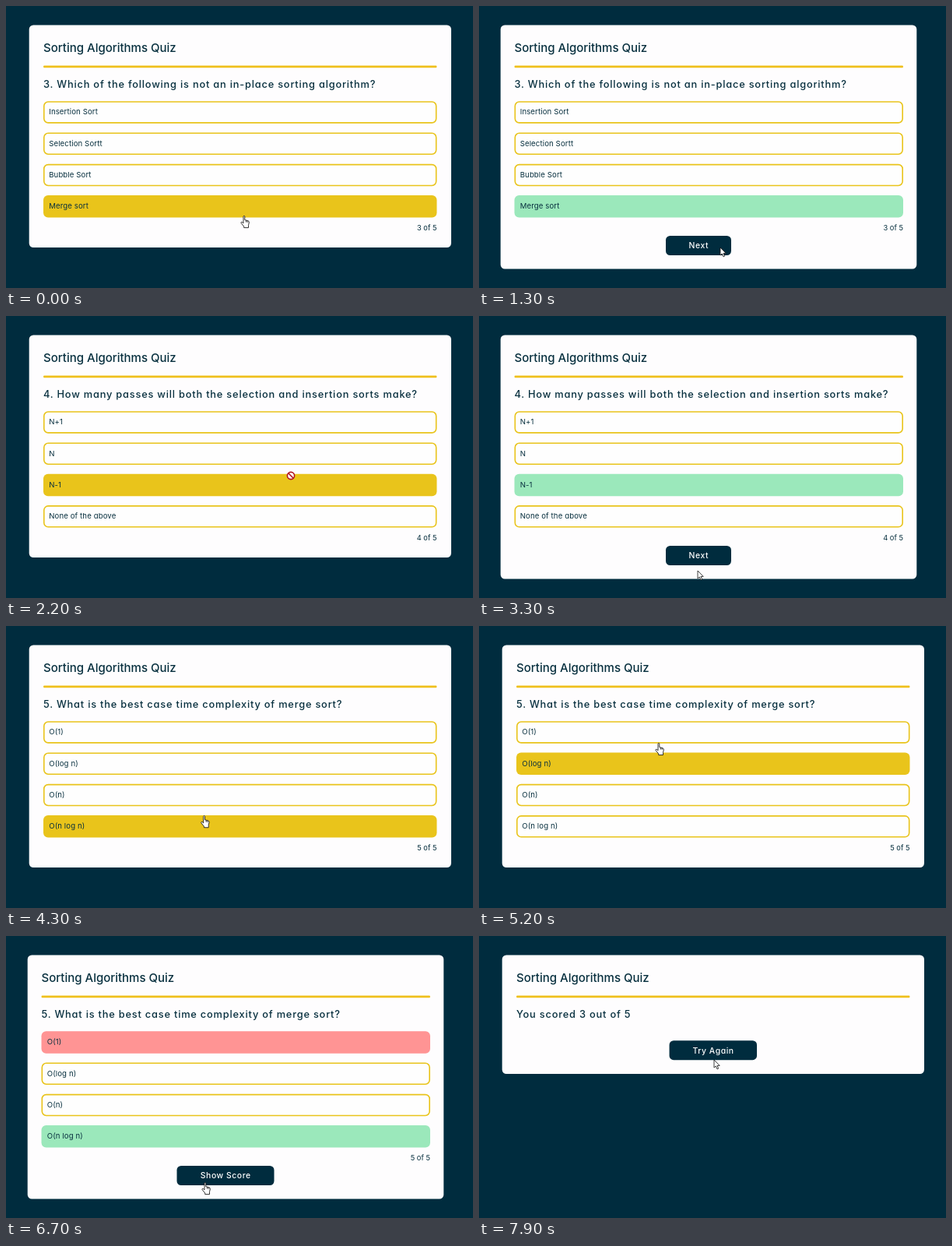
An HTML page for the animation above (8 s loop, 600 by 362 pixels).

```html
<!DOCTYPE html>
<html lang="en">
<head>
<meta charset="utf-8">
<title>Sorting Algorithms Quiz</title>
<style>
  html, body { margin: 0; width: 100%; height: 100%; overflow: hidden; background: #002c3e; }
  svg { display: block; width: 600px; height: 362px; }
  text {
    font-family: Inter, "Open Sans", sans-serif;
    font-feature-settings: "cv11";
    fill: #08303f;
    white-space: pre;
  }
  .title { font-size: 15px; font-weight: 500; }
  .question { font-size: 12.8px; font-weight: 500; letter-spacing: .8px; }
  .option { font-size: 9.6px; letter-spacing: .12px; }
  .count { font-size: 9.3px; text-anchor: end; }
  .button { font-size: 10.4px; font-weight: 500; letter-spacing: .55px; text-anchor: middle; fill: #fff; }
</style>
</head>
<body>
<svg id="stage" viewBox="0 0 600 362"></svg>
<script>
const stage = document.getElementById('stage');
const LOOP = 8000, STEP = 100;
const NAVY = '#002c3e', GOLD = '#e9c41b', GREEN = '#9be8bb', RED = '#ff9494';

// Each question: when it appears, when it is answered, which options are right and wrong.
const quiz = [
  { start: 0, answered: 400, right: 3, button: 'Next', width: 84,
    text: '3. Which of the following is not an in-place sorting algorithm?',
    options: ['Insertion Sort', 'Selection Sortt', 'Bubble Sort', 'Merge sort'] },
  { start: 1400, answered: 2300, right: 2, button: 'Next', width: 84,
    text: '4. How many passes will both the selection and insertion sorts make?',
    options: ['N+1', 'N', 'N-1', 'None of the above'] },
  { start: 4000, answered: 5700, right: 3, wrong: 0, button: 'Show Score', width: 125,
    text: '5. What is the best case time complexity of merge sort?',
    options: ['O(1)', 'O(log n)', 'O(n)', 'O(n log n)'] },
];
const SCORE_AT = 7200;

// Pointer path: time, x, y and, where needed, a fixed cursor.
const path = [
  [0, 306, 269], [200, 306, 267], [300, 306, 267], [1000, 311, 307], [1200, 311, 307],
  [1300, 310, 310, 'arrow'], [1900, 366, 207], [2100, 366, 207], [2200, 366, 205, 'blocked'],
  [2600, 366, 205], [3300, 281, 327], [3400, 281, 327], [3700, 281, 306], [3900, 281, 306],
  [4600, 235, 196], [4700, 235, 196], [5000, 231, 165], [5100, 231, 165], [5200, 231, 150],
  [5400, 232, 142], [5600, 232, 142], [6500, 259, 306], [6700, 256, 316], [7700, 256, 316],
  [7900, 302, 159],
];

const cursors = {
  arrow: '<path d="M0 0V10L2.3 8 4 11.9 5.7 11.1 4 7.4H7.2Z" fill="#fff" stroke="#111" stroke-width=".8"/>',
  hand: '<path transform="translate(-5 0)" d="M4 1.3C4 .1 5.8.1 5.8 1.3V5.6L9.9 6.7Q11.5 7.1 11.3 9L10.5 12.4V15.6H4.7V14L1.1 9.7C.4 8.6 1.8 7.7 2.7 8.6L4 9.8ZM7.4 6.2V8.5M9.2 6.7V8.8" fill="#fff" stroke="#111" stroke-width=".85"/>',
  blocked: '<circle r="4.6" fill="#fff" stroke="#b3131f" stroke-width="1.6"/><path d="M-3.2-3.2 3.2 3.2" stroke="#b3131f" stroke-width="1.6"/>',
};

const rect = (x, y, w, h, r, fill, extra = '') =>
  `<rect x="${x}" y="${y}" width="${w}" height="${h}" rx="${r}" fill="${fill}" ${extra}/>`;
const text = (kind, x, y, str) => `<text class="${kind}" x="${x}" y="${y}">${str}</text>`;
const button = (cx, y, w, label) =>
  rect(cx - w / 2, y, w, 25, 5.5, NAVY) + text('button', cx + .3, y + 16.3, label);

const optionTop = i => 122.2 + 40.3 * i;
const optionAt = y => [0, 1, 2, 3].find(i => y >= optionTop(i) && y <= optionTop(i) + 28.5);

function pointer(t) {
  const i = path.findLastIndex(k => k[0] <= t);
  const a = path[i], b = path[i + 1] || a;
  const f = b === a ? 0 : (t - a[0]) / (b[0] - a[0]);
  return {
    x: a[1] + (b[1] - a[1]) * f,
    y: a[2] + (b[2] - a[2]) * f,
    fixed: a[0] === t ? a[3] : undefined,
  };
}

function cursorKind(p, q, done) {
  if (p.fixed) return p.fixed;
  if (!q) return 'arrow';
  if (optionAt(p.y) !== undefined) return done ? 'blocked' : 'hand';
  const onButton = done && p.y >= 295 && p.y <= 320 && Math.abs(p.x - 282) <= q.width / 2;
  return onButton ? 'hand' : 'arrow';
}

function option(q, i, left, width, done, hover) {
  const y = optionTop(i);
  let fill = hover === i ? GOLD : null;
  if (done && i === q.right) fill = GREEN;
  if (done && i === q.wrong) fill = RED;
  const box = fill
    ? rect(left, y, width, 28.5, 6, fill)
    : rect(left + .8, y + .8, width - 1.6, 26.9, 5.4, '#fefefe', `stroke="${GOLD}" stroke-width="1.6"`);
  return box + text('option', left + 7.2, y + 17.2, q.options[i]);
}

function draw(t) {
  const n = quiz.findLastIndex(q => q.start <= t);
  const q = t < SCORE_AT ? quiz[n] : null;
  const done = !!q && t >= q.answered;
  // The scrollbar that comes with the taller card narrows the page.
  const left = done ? 45.5 : 48, width = done ? 499.5 : 505.5;
  const bottom = !q ? 177 : done ? 337.5 : 310;

  let out = rect(0, 0, 600, 362, 0, NAVY);
  out += rect(done ? 27.7 : 29.7, 24.5, done ? 534.6 : 542.3, bottom - 24.5, 5.5, '#fefdfe');
  out += text('title', left, 59.3, 'Sorting Algorithms Quiz');
  out += rect(left, 76.5, width, 2.7, 1.2, '#efc01c');

  if (q) {
    const hover = done ? -1 : optionAt(pointer(Math.max(0, t - STEP)).y);
    out += text('question', left, 105, q.text);
    q.options.forEach((_, i) => { out += option(q, i, left, width, done, hover); });
    out += text('count', left + width, 287.5, `${n + 3} of 5`);
    if (done) out += button(282, 295, q.width, q.button);
  } else {
    out += text('question', left, 105, 'You scored 3 out of 5');
    out += button(300.8, 134.2, 112.5, 'Try Again');
  }

  const p = pointer(t);
  out += `<g transform="translate(${p.x} ${p.y})">${cursors[cursorKind(p, q, done)]}</g>`;
  stage.innerHTML = out;
}

let shown = -1;
function tick() {
  const t = Math.floor(performance.now() % LOOP / STEP) * STEP;
  if (t !== shown) draw(shown = t);
  requestAnimationFrame(tick);
}
tick();
</script>
</body>
</html>
```
